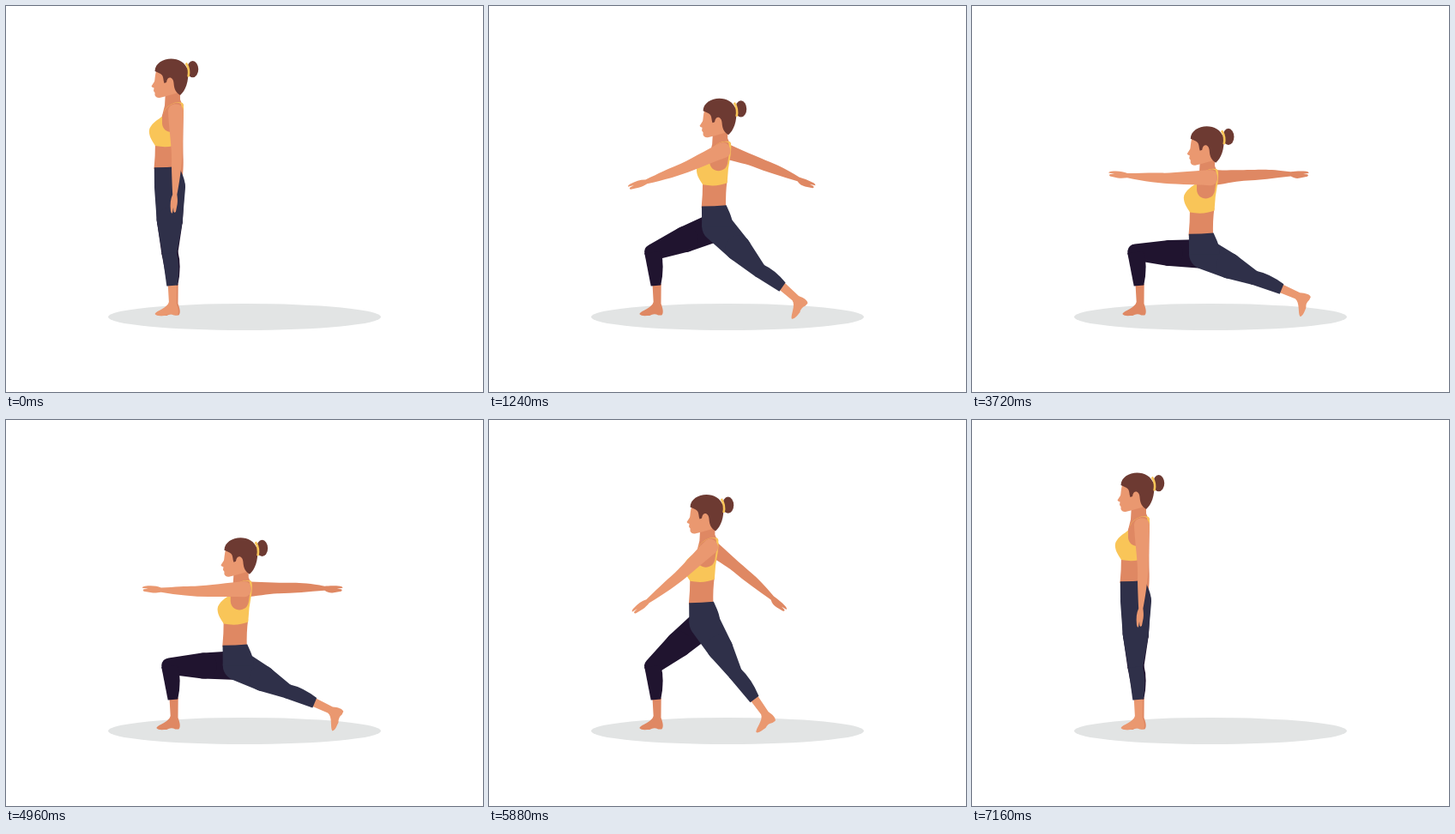
An HTML page with a canvas for the animation above (7200 ms loop, 556 px wide and 450 px high).

```html
<!DOCTYPE html>
<html lang="en">
<head>
<meta charset="utf-8">
<title>Warrior lunge</title>
<style>
html, body { margin: 0; width: 100%; height: 100%; overflow: hidden; background: #fff; }
canvas { display: block; }
</style>
</head>
<body>
<canvas id="stage" width="556" height="450"></canvas>
<script>
const ctx = document.getElementById('stage').getContext('2d');
const LOOP = 7200, STEP = 40, RETURN = 6800;
const C = {
  ground: '#e2e4e4', skin: '#ea9870', shade: '#df8863', hair: '#6d3a32',
  gold: '#f9c558', navy: '#2f3049', dark: '#20142f'
};

// Poses from standing to full lunge: body offset, rear knee, rear cuff, foot turn, arm spread.
const times = [20, 520, 640, 1320, 2020];
const poses = [
  [0, 0, 190.5, 288, 193.5, 326, 0, 1.5],
  [33, 5, 243, 290, 255.5, 321, -18, 25],
  [42.5, 9, 256, 288, 273, 323, -22, 32],
  [76.5, 49.5, 318, 310, 346, 328, -50, 72],
  [80, 77.5, 328, 316.5, 361, 330, -65, 92.3]
];

// Monotone cubic interpolation, at rest at both ends.
function poseAt(t) {
  const last = times.length - 1;
  t = Math.min(Math.max(t, times[0]), times[last]);
  let i = 0;
  while (i < last - 1 && t > times[i + 1]) i++;
  const h = times[i + 1] - times[i], u = (t - times[i]) / h;
  return poses[0].map((_, k) => {
    const slope = j => (poses[j + 1][k] - poses[j][k]) / (times[j + 1] - times[j]);
    const tangent = j => {
      if (j === 0 || j === last) return 0;
      const a = slope(j - 1), b = slope(j);
      return a * b > 0 ? 2 * a * b / (a + b) : 0;
    };
    const w = u * u * (3 - 2 * u);
    return poses[i][k] * (1 - w) + poses[i + 1][k] * w +
      h * (tangent(i) * u * (1 - u) ** 2 - tangent(i + 1) * u * u * (1 - u));
  });
}

function fill(color, path) {
  ctx.fillStyle = color;
  ctx.fill(new Path2D(path));
}

function placed(x, y, degrees, draw, sx = 1, sy = 1) {
  ctx.save();
  ctx.translate(x, y);
  ctx.rotate(degrees * Math.PI / 180);
  ctx.scale(sx, sy);
  draw();
  ctx.restore();
}

// Hull of two circles.
function taper(color, [ax, ay, ar], [bx, by, br]) {
  const dir = Math.atan2(by - ay, bx - ax);
  const side = Math.acos((ar - br) / Math.hypot(bx - ax, by - ay));
  ctx.fillStyle = color;
  ctx.beginPath();
  ctx.arc(ax, ay, ar, dir + side, dir - side + 2 * Math.PI);
  ctx.arc(bx, by, br, dir - side, dir + side);
  ctx.fill();
}

function leg(color, hip, knee, cuff, cuffRadius) {
  const [hx, hy, hr] = hip, [kx, ky, kr] = knee, [cx, cy] = cuff;
  const middle = [(hx + kx) / 2, (hy + ky) / 2, (hr + kr) / 2 + 1.8];
  taper(color, hip, middle);
  taper(color, middle, knee);
  const len = Math.hypot(cx - kx, cy - ky);
  const nx = (cy - ky) / len, ny = (kx - cx) / len;
  const bx = kx + (cx - kx) * 0.45, by = ky + (cy - ky) * 0.45;
  ctx.beginPath();
  ctx.moveTo(kx - nx * kr, ky - ny * kr);
  ctx.lineTo(cx - nx * cuffRadius, cy - ny * cuffRadius);
  ctx.lineTo(cx + nx * cuffRadius, cy + ny * cuffRadius);
  ctx.quadraticCurveTo(bx + nx * (kr + 3), by + ny * (kr + 3), kx + nx * kr, ky + ny * kr);
  ctx.fill();
}

function foot(color, x, y, turn) {
  placed(x, y, turn, () => fill(color,
    'M-4.8-2L-3.6 19C-5 26-18 29-20 33C-18 36-13 35-8 35Q-3 32 2 34.5L6 34.5C8.5 32 7.5 27 5.2 21L5.4-2Z'));
}

// The bow bends the middle of the arm to one side.
function arm(color, x, y, degrees, bow, sx, sy) {
  const top = h => bow - h, low = h => bow + h, wrist = bow / 2;
  placed(x, y, degrees, () => fill(color,
    `M0-9C-11-9-11 9 0 9C15 8.5 28 ${low(6.5)} 40 ${low(6.3)}C58 ${low(6.5)} 78 ${low(4.5)} 97 ${wrist + 2.6}` +
    'C101 4.5 104 5 108 4.5L117 3Q119 1.5 117 .5L112 0L119-1Q119-2.5 116-3' +
    `C108-4-0 102-3.5 97 ${wrist - 2.6}C80 ${top(5)} 68 ${top(6)} 58 ${top(6)}C42 ${top(6)} 18-8 0-9Z`
      .replace('-4-0 102', '-4 102')), sx, sy);
}

function torso() {
  fill(C.shade, 'M186 98L203 98L203 109Q204 113 207 115L204 132L181 132L185 116Z');
  fill(C.shade, 'M174 158L202.5 158Q200.5 172 201 190L172.5 190Q174 175 174 158Z');
  fill(C.gold, 'M183 128C178 132 167 138 166.8 146C167 153 171 158 174 163Q190 166 202.5 161' +
    'Q203 145 206.5 128Q208 117 206 113Q194 110 185 121Z');
  fill(C.shade, 'M186 120Q196 110 204 114C206 122 204 132 203 138C201 150 183 150 182 137L182 128Z');
}

function head() {
  fill(C.skin, 'M177 70C173 80 174 85 173 88L169.5 93.5Q170 95 172.5 95.5L172 99L173.5 101' +
    'L173.5 104Q175 107.5 179 107L187 105L201 101L200 72Z');
  fill(C.hair, 'M173.5 76C174 59 206 55 212 75C213.5 88 209 99 203 104C198 101 196 97 195.5 90' +
    'C195 82 188 81 187 89L184.5 90C183 86 184 81 180 79Q176 77 173.5 76Z');
  ctx.beginPath();
  ctx.ellipse(217.6, 73.7, 6.6, 9.6, 0, 0, 2 * Math.PI);
  ctx.fill();
  ctx.strokeStyle = C.gold;
  ctx.lineWidth = 2.6;
  ctx.stroke(new Path2D('M209.8 66.5Q214.5 74 212.5 82.5'));
}

function draw(t) {
  const [dx, dy, kneeX, kneeY, cuffX, cuffY, turn, spread] = poseAt(Math.min(t, RETURN - t));
  const body = part => placed(dx, dy, 0, part);
  const shoulderX = 198 + dx, shoulderY = 122.8 + dy;
  const hipX = 191 + dx, hipY = 211.5 + dy;
  const nod = spread / 75;

  ctx.fillStyle = '#fff';
  ctx.fillRect(0, 0, 556, 450);
  ctx.fillStyle = C.ground;
  ctx.beginPath();
  ctx.ellipse(278, 362.5, 159, 15.5, 0, 0, 2 * Math.PI);
  ctx.fill();

  arm(C.shade, shoulderX, shoulderY, 90 - spread, -1.2, 0.965, 1);
  foot(C.shade, 195.3, 326, 0);
  leg(C.dark, [hipX, hipY, 17], [190.8, 287, 9.6], [194.5, 326], 5.8);
  body(torso);
  foot(C.skin, cuffX, cuffY, turn);
  leg(C.navy, [hipX, hipY, 18], [kneeX, kneeY, 8.4], [cuffX, cuffY], 6.2);
  body(() => fill(C.navy, 'M172.8 188.3Q188 188.3 201.5 187C205 195 209 202 209 212L173 212Z'));
  placed(dx + nod, dy + nod, 0, head);
  arm(C.skin, shoulderX, shoulderY, 90 + spread, 2.6, 1, -1);
}

const start = performance.now();
function tick() {
  const t = (performance.now() - start) % LOOP;
  draw(Math.floor(t / STEP) * STEP);
  requestAnimationFrame(tick);
}
tick();
</script>
</body>
</html>
```
